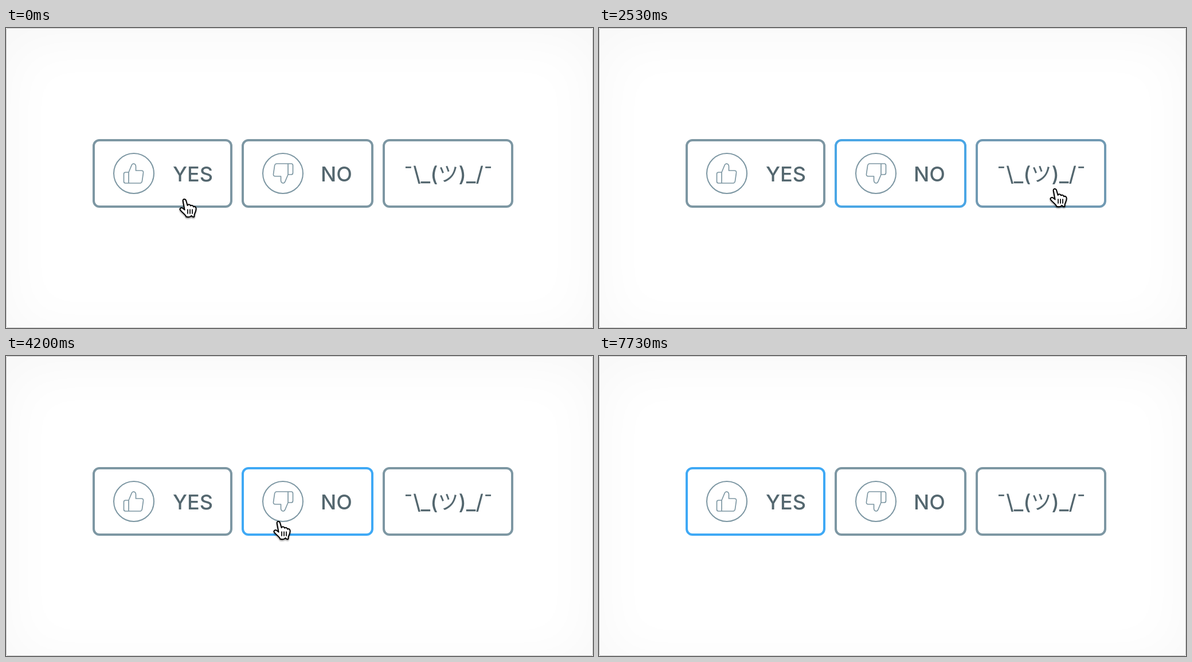
Recreate the animation shown at these times as an HTML page. Size 1024x524 px, loop 7790 ms.

```html
<!DOCTYPE html>
<html lang="en">
<head>
<meta charset="utf-8">
<title>Yes, no, shrug</title>
<style>
  :root { --gray: #7d97a3; --blue: #3fa9f5; --loop: 7790ms; }
  html, body { margin: 0; width: 100%; height: 100%; overflow: hidden; background: #fff; }
  .stage {
    position: relative; width: 1024px; height: 524px; box-sizing: border-box;
    border: 1px solid #c6c6c6; border-radius: 3px;
    box-shadow: inset 0 16px 100px rgba(0, 0, 0, .036);
  }
  svg { position: absolute; left: -1px; top: -1px; display: block; }
  .box { fill: none; stroke: var(--gray); stroke-width: 4; animation: var(--loop) ease infinite; }
  .yes { animation-name: yes; }
  .no { animation-name: no; }
  .shrug { animation-name: shrug; }
  .icon { fill: none; stroke: var(--gray); stroke-width: 1.7; stroke-linejoin: round; }
  text {
    font: 500 36px Inter, "Noto Sans CJK JP", "Noto Sans CJK", sans-serif;
    font-feature-settings: "calt" 0; fill: #54676f;
  }
  .cursor {
    filter: drop-shadow(0 2px 1px rgba(0, 0, 0, .4));
    animation: move var(--loop) ease-in-out infinite, show var(--loop) step-end infinite;
  }
  .hand { fill: #fff; stroke: #000; stroke-width: 2; stroke-linejoin: round; }
  .lines { fill: none; stroke: #000; stroke-width: 1.7; stroke-linecap: round; }

  @keyframes yes {
    0%, 6.8%, 26.7%, 41.98%, 54.3%, 61.49% { stroke: var(--gray); }
    11.94%, 21.57%, 47.11%, 49.17%, 66.62%, 100% { stroke: var(--blue); }
  }
  @keyframes no {
    0%, 21.57%, 36.84%, 49.17%, 66.62%, 100% { stroke: var(--gray); }
    26.7%, 31.71%, 54.3%, 61.49% { stroke: var(--blue); }
  }
  @keyframes shrug {
    0%, 31.71%, 47.11%, 100% { stroke: var(--gray); }
    36.84%, 41.98% { stroke: var(--blue); }
  }
  @keyframes move {
    0%, 11.94% { transform: translate(302px, 298px); }
    15.4%, 25.29% { transform: translate(564px, 298px); }
    28.24% { transform: translate(768px, 243px); }
    29.91%, 36.59% { transform: translate(786px, 280px); }
    41.08%, 45.31% { transform: translate(284px, 288px); }
    48.01%, 54.3% { transform: translate(466px, 288px); }
    56.87% { transform: translate(847px, 300px); animation-timing-function: ease-in; }
    59.05% { transform: translate(600px, 297px); animation-timing-function: ease-out; }
    60.85% { transform: translate(308px, 300px); }
    67.52% { transform: translate(308px, 300px); animation-timing-function: ease-in; }
    69.32% { transform: translate(371px, 351px); animation-timing-function: linear; }
    71.89%, 72.4% { transform: translate(430px, 417px); animation-timing-function: step-end; }
    75.35% { transform: translate(370px, 400px); animation-timing-function: linear; }
    77.02% { transform: translate(321px, 310px); animation-timing-function: linear; }
    78.69% { transform: translate(380px, 215px); animation-timing-function: ease-out; }
    81.26%, 82.8% { transform: translate(459px, 300px); }
    85.49% { transform: translate(480px, 417px); animation-timing-function: step-end; }
    100% { transform: translate(302px, 298px); }
  }
  @keyframes show {
    0%, 75.35% { opacity: 1; }
    72.4%, 86.39%, 99.999% { opacity: 0; }
    100% { opacity: 1; }
  }
</style>
</head>
<body>
<div class="stage">
  <svg width="1024" height="524" viewBox="0 0 1024 524">
    <defs>
      <g id="thumb" class="icon">
        <circle r="35" stroke-width="2"/>
        <path d="M-9 -2H-14.5Q-17.5 -2 -17.5 1V14Q-17.5 17 -14.5 17H-9Z
                 M-9 -2L-4 -14Q-2.8 -17 -0.5 -17Q3.5 -16.5 3.5 -12V-5H13Q17 -5 16.5 -1L14.5 13Q14 17 10.5 17H-9"/>
      </g>
    </defs>

    <rect class="box yes" x="153" y="196" width="240" height="116" rx="10"/>
    <use href="#thumb" x="223" y="254"/>
    <text x="291" y="268">YES</text>

    <rect class="box no" x="413" y="196" width="226" height="116" rx="10"/>
    <use href="#thumb" transform="translate(483 254) rotate(180)"/>
    <text x="549" y="268">NO</text>

    <rect class="box shrug" x="659" y="196" width="224" height="116" rx="10"/>
    <text x="771.5" y="268" text-anchor="middle">¯\_(ツ)_/¯</text>

    <g class="cursor">
      <path class="hand" d="M6.8 4.5C5.8 .2 10.8 -.2 12 3.2L14.6 12C15.5 9.4 19.4 9.8 20 12.6
        C21.5 10.8 24.6 11.8 25 14.4C27 13 29.8 14.4 29.6 18C29.4 22.5 27.6 24.5 26.6 28L26.4 31.5
        Q23.5 33 21.5 29.8Q19.5 33 12.5 31.8C11 27.5 5.5 24.5 2 20C.2 17 3.6 14.8 6.6 17L9.6 19.6Z"/>
      <path class="lines" d="M15 19V26M19 19V26M23 19V26"/>
    </g>
  </svg>
</div>
</body>
</html>
```
